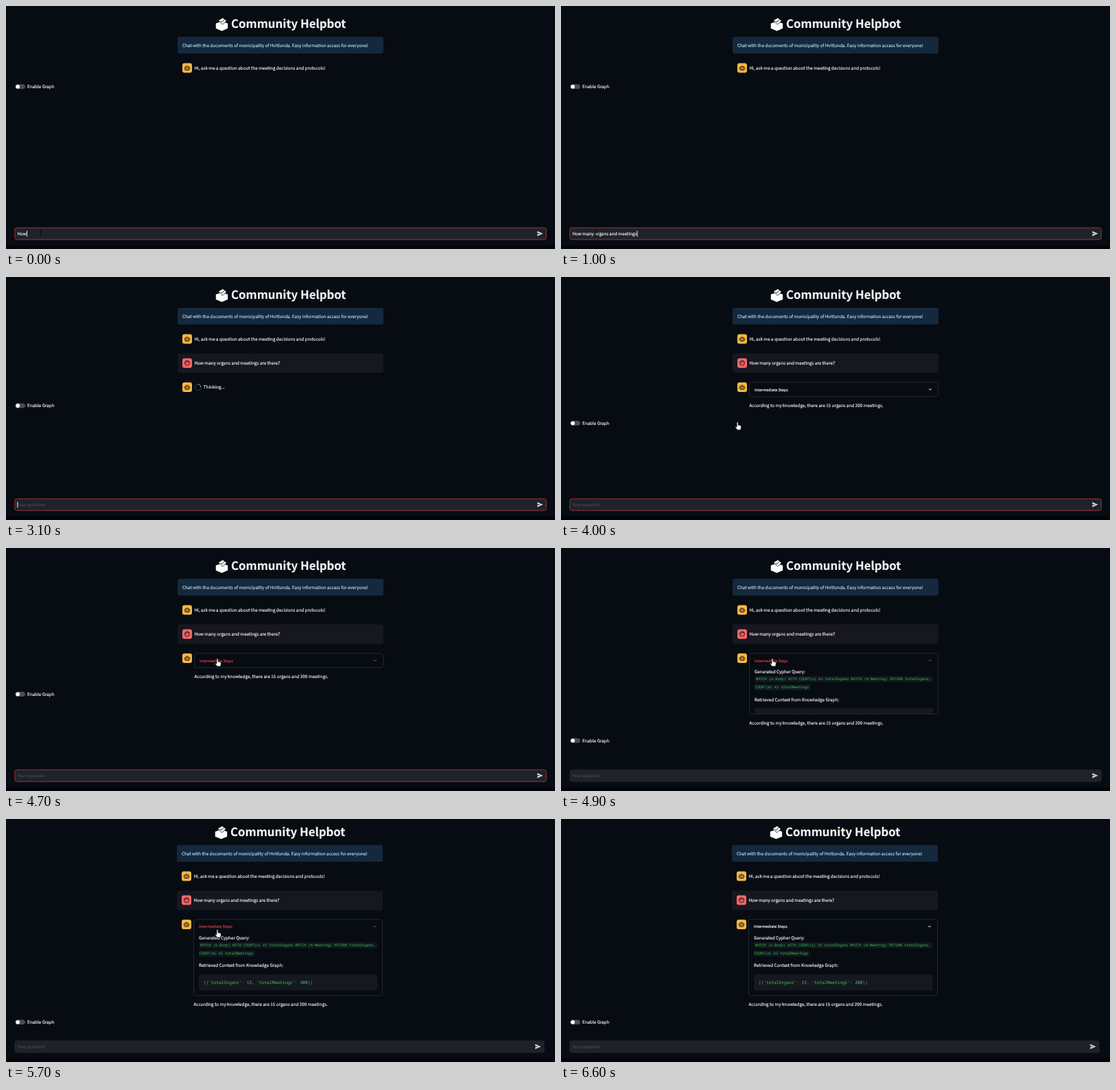
An HTML page for the animation above (6700 ms loop, 800 by 355 pixels).

```html
<!DOCTYPE html>
<html lang="en">
<head>
<meta charset="utf-8">
<title>Community Helpbot</title>
<style>
  html, body { margin: 0; width: 100%; height: 100%; overflow: hidden; background: #070b12; }
  svg { display: block; width: 800px; height: 355px; }
  text {
    font: 6.3px "Noto Sans CJK JP", "Noto Sans CJK SC", "Noto Sans", sans-serif;
    color: #f4f5f6; fill: currentColor; stroke: currentColor; stroke-width: .16px;
    white-space: pre; text-rendering: geometricPrecision;
  }
  .title { font-size: 16.8px; font-weight: 700; }
  .info { color: #bfdcf0; }
  .small { font-size: 5.52px; }
  .hint { color: #54575f; stroke: none; }
  .code { font: 5.26px "Noto Sans Mono", "DejaVu Sans Mono", monospace; color: #2b943f; }
  .block { font-size: 6.16px; color: #56786e; }
  .str { fill: #30a050; stroke: #30a050; }
  .num { fill: #469a8c; stroke: #469a8c; }
  .line { fill: none; stroke: #2c2118; stroke-width: 1; }
</style>
</head>
<body>
<svg viewBox="0 0 800 355">
  <defs>
    <g id="bot">
      <rect width="14" height="14" rx="3" fill="#f8b844"/>
      <path class="line" d="M4.2 5.2h5.6v5h-5.6zM7 5V3.3M3.1 6.6v1.8M10.9 6.6v1.8M5.6 8.8h2.8"/>
      <path d="M5.2 6.2h1.2v1.2h-1.2zM7.6 6.2h1.2v1.2h-1.2z" fill="#2c2118"/>
    </g>
    <clipPath id="panelClip"><rect id="clipBox" x="274" y="154" width="276" height="21"/></clipPath>
  </defs>

  <rect width="800" height="355" fill="#070b12"/>

  <g id="page">
    <g fill="#fff" stroke="#070b12">
      <path d="M305.8 25.6l8.7-3.4 8.7 3.4v7.2l-8.7 3.6-8.7-3.6z" stroke="none"/>
      <path d="M309.5 21l6.5-3.8 5.5 4.6-6 5.2z" stroke-width=".8"/>
      <path d="M312.6 22l2.2 1.5 2.8-3.4" fill="none" stroke-width=".9"/>
    </g>
    <text class="title" x="328" y="32.4">Community Helpbot</text>
    <rect x="250" y="45" width="300" height="24.5" rx="3" fill="#14283e"/>
    <text class="info" x="257" y="60">Chat with the documents of municipality of Hvitlunda. Easy information access for everyone!</text>
    <use href="#bot" x="257" y="83.5"/>
    <text x="274.5" y="92.9">Hi, ask me a question about the meeting decisions and protocols!</text>

    <g id="asked">
      <rect x="250" y="111.5" width="300" height="28.5" rx="3" fill="#17171f"/>
      <g transform="translate(257 118.7)">
        <rect width="14" height="14" rx="3" fill="#fa666a"/>
        <circle class="line" cx="7" cy="7" r="3.6"/>
        <path class="line" d="M3.7 6.2q3.6.2 4-2.4q.8 2 2.7 2"/>
        <path d="M5.2 7.2h1v1h-1zM7.8 7.2h1v1h-1z" fill="#2c2118"/>
      </g>
      <text x="274.5" y="128.2">How many organs and meetings are there?</text>
      <use href="#bot" x="257" y="154"/>
    </g>

    <g id="thinking">
      <g fill="none" stroke-width="1.4">
        <circle cx="279.5" cy="161" r="4.4" stroke="#27333f"/>
        <path id="spinner" d="M276.4 157.9a4.4 4.4 0 0 1 6.2 0" stroke="#66717b"/>
      </g>
      <text x="287.8" y="163.3">Thinking...</text>
    </g>

    <g id="reply">
      <g clip-path="url(#panelClip)">
        <text x="282" y="182.7">Generated Cypher Query:</text>
        <rect x="282" y="187" width="260" height="9" rx="1.5" fill="#12171f"/>
        <rect x="282" y="199" width="82" height="9" rx="1.5" fill="#12171f"/>
        <text class="code" x="284" y="193.3">MATCH (o:Body) WITH COUNT(o) AS totalOrgans MATCH (m:Meeting) RETURN totalOrgans,</text>
        <text class="code" x="282.5" y="205.2">COUNT(m) AS totalMeetings</text>
        <text x="282" y="223.6">Retrieved Context from Knowledge Graph:</text>
        <rect x="282" y="234" width="260.5" height="23.5" rx="3" fill="#15181f"/>
        <text class="code block" x="289" y="248.2">[{<tspan class="str">'totalOrgans'</tspan>: <tspan class="num">15</tspan>, <tspan class="str">'totalMeetings'</tspan>: <tspan class="num">200</tspan>}]</text>
      </g>
      <rect id="panel" x="274.5" y="153.8" width="275" height="21" rx="3" fill="none" stroke="#282b34" stroke-width=".9"/>
      <text id="header" class="small" x="282" y="166.6">Intermediate Steps</text>
      <path id="chevron" d="M536 163.2l2 2 2-2" fill="none" stroke-width="1"/>
      <text id="answer" x="274.5" y="190.2">According to my knowledge, there are 15 organs and 200 meetings.</text>
    </g>
  </g>

  <g id="toggle">
    <rect x="13.5" y="-3.5" width="14.5" height="7" rx="3.5" fill="#4a4c56"/>
    <circle cx="17.2" r="2.9" fill="#fff"/>
    <text x="31" y="2.3">Enable Graph</text>
  </g>

  <rect y="350" width="800" height="5" fill="#02050b"/>
  <rect id="field" x="12.8" y="324" width="774.5" height="17.2" rx="3" fill="#202229" stroke-width="1"/>
  <text id="entry" x="16.5" y="335"></text>
  <rect id="caret" y="328.3" width=".9" height="8.6" fill="#fff"/>
  <path id="send" d="M774.2 328.8l8.3 3.7-8.3 3.7.1-2.9 4.7-.8-4.7-.8z" fill="#d3d5d9"/>

  <path id="beam" d="M49 328.4h2.4M50.2 328.4v8M49 336.4h2.4" fill="none" stroke="#05070b" stroke-width=".8"/>
  <path id="hand" d="M-.9 0q.9-.8 1.8 0v4l3.6 1q1 .4.8 1.6l-.7 4.2h-5l-2.6-3.6q-.2-1.2 1-.8l1.1.8z" fill="#fff" stroke="#10131a" stroke-width=".5"/>
</svg>
<script>
const LOOP = 6700, SENT = 1500, THINK = 1600, ANSWER = 3700, OPEN = 4780;
const QUESTION = 'How many organs and meetings are there?';
const $ = id => document.getElementById(id);
const set = (id, attrs) => {
  for (const key in attrs) $(id).setAttribute(key, attrs[key]);
};
const show = (id, on) => set(id, { visibility: on ? 'visible' : 'hidden' });
const clamp = x => Math.max(0, Math.min(1, x));

function draw(t) {
  const answered = t >= ANSWER, opened = t >= OPEN;
  const headerColor = t >= 4300 && t < 5900 ? '#d63c42' : '#f4f5f6';
  const grow = 90.3 * (1 - (1 - clamp((t - OPEN) / 500)) ** 5);
  const scroll = Math.max(0, grow - 83.2);
  const shift = scroll > 0 ? 1 : 0; // scrollbar narrows the page

  show('asked', t >= THINK);
  show('thinking', t >= THINK && !answered);
  show('reply', answered);
  set('page', { transform: `translate(${-shift} ${-scroll})` });
  set('spinner', { transform: `rotate(${t / 750 * 360} 279.5 161)` });

  set('panel', { height: 21 + grow });
  set('clipBox', { height: 21 + grow });
  set('answer', { y: 190.2 + grow });
  $('header').style.color = headerColor;
  set('chevron', {
    stroke: headerColor,
    transform: opened ? 'rotate(180 538 164.2)' : ''
  });
  const row = 117.8 + (t >= THINK ? 70.2 : 0) + (answered ? 25.6 : 0);
  set('toggle', { transform: `translate(0 ${row + grow - scroll})` });

  // Input field
  const typing = t < SENT;
  const count = 3 + Math.floor(clamp(t / 1400) * (QUESTION.length - 3));
  const entry = $('entry');
  entry.textContent = typing ? QUESTION.slice(0, count) : 'Your question';
  set('entry', { class: typing ? '' : 'hint' });
  set('caret', { x: typing ? 16.6 + entry.getComputedTextLength() : 16.4 });
  show('caret', typing || (!opened && (t - 900) % 1060 < 530));
  set('field', { width: 774.5 - 3 * shift, stroke: opened ? '#202229' : '#9c3038' });
  set('send', { transform: `translate(${-3 * shift} 0)` });

  // Pointer
  show('beam', t < 2200);
  show('hand', answered && t < 6000);
  const k = Math.min(1, (t - 4000) / 300);
  set('hand', { transform: `translate(${257 + 51 * k} ${212.5 - 50.5 * k})` });
}

const start = performance.now();
function tick() {
  draw((performance.now() - start) % LOOP);
  requestAnimationFrame(tick);
}
tick();
</script>
</body>
</html>
```
